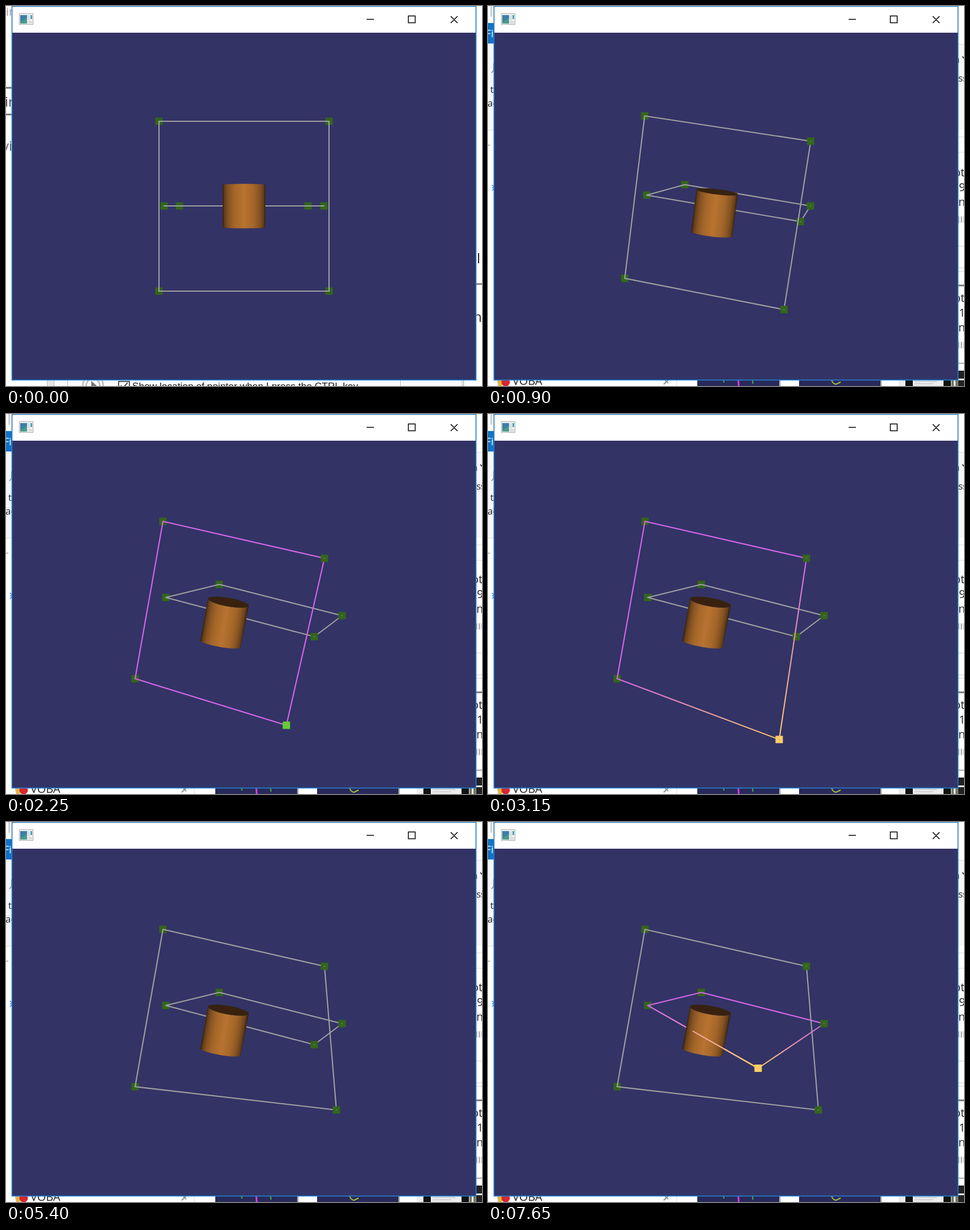
An HTML page for the animation above (8 s loop, 837 by 669 pixels).

```html
<!DOCTYPE html>
<html lang="en">
<head>
<meta charset="utf-8">
<title>Box handles around a cylinder</title>
<style>
  html, body { margin: 0; width: 100%; height: 100%; overflow: hidden; background: #fff; }
  svg { display: block; width: 837px; height: 669px; }
  text { font-family: "Open Sans", "Noto Sans", sans-serif; font-size: 20px; fill: #222; }
</style>
</head>
<body>
<svg viewBox="0 0 837 669" xmlns="http://www.w3.org/2000/svg">
  <defs>
    <clipPath id="listClip"><rect x="820" y="274" width="17" height="395"/></clipPath>
  </defs>
  <rect width="837" height="669" fill="#fff"/>

  <g id="settings">
    <text x="0" y="17" style="fill:#999">ir</text>
    <path d="M0 144H11M0 191H11" stroke="#777" stroke-width="3"/>
    <text x="-2" y="177" style="font-size:24px;fill:#555">ir</text>
    <text x="-7" y="255" style="font-size:24px;fill:#666">vi</text>
    <text x="828" y="453" style="font-size:24px">l</text>
    <path d="M826 489.500H837" stroke="#888" stroke-width="3"/>
    <text x="822" y="556" style="font-size:24px">no</text>
    <rect x="72" y="658" width="734" height="11" fill="#e6e6e6"/>
    <rect x="84" y="658" width="716" height="11" fill="#fafafa"/>
    <path d="M72.500 658V669M84.500 658V669M108.500 658V669M693.500 658V669M804.500 658V669" stroke="#bbb"/>
    <g fill="none" stroke="#bbb" stroke-width="2.500">
      <circle cx="153" cy="668" r="18"/><circle cx="153" cy="668" r="12"/>
    </g>
    <path d="M150 660L160 669H150Z" fill="#777"/>
    <path d="M198 669V661H217V669M202 668L206 672L214 663" fill="none" stroke="#222" stroke-width="1.500"/>
    <text x="222" y="675" style="font:17.300px 'Liberation Sans',Arial,sans-serif">Show location of pointer when I press the CTRL key</text>
  </g>

  <g id="files">
    <rect y="66" width="837" height="152" fill="#f5f6f7"/>
    <path d="M0 218.500H11M826 67.500H837M826 230.500H837M826 257.500H837" stroke="#ddd"/>
    <path d="M5.500 0V19" stroke="#888"/>
    <rect y="30" width="11" height="36" fill="#1173c7"/>
    <text x="-4" y="55" style="font-size:18px;fill:#fff">Fil</text>
    <path d="M6 118L10 113L10 101" fill="none" stroke="#999" stroke-width="2"/>
    <text x="4" y="153" style="font-size:17px">t</text>
    <text x="-1" y="177" style="font-size:17px">ac</text>
    <path d="M0 245H4" stroke="#bbb" stroke-width="2"/>
    <path d="M7 320H11M7 315L11 319M7 325L11 321" stroke="#2d8bd8" stroke-width="1.500"/>
    <text x="819" y="100" style="font-size:17px">n</text>
    <path d="M834 89L837 92" stroke="#444" stroke-width="2"/>
    <text x="827" y="133" style="font-size:17px">ss</text>

    <path d="M16 660L22 655L27 663L24 669H18Z" fill="#e0b84c"/>
    <circle cx="31" cy="662" r="7.500" fill="#d9272e"/>
    <text x="43" y="667">VOBA</text>
    <path d="M309 666L314 661M311 658L317 664M314 661L319 656" stroke="#8a949c" stroke-width="2"/>
    <path d="M331.500 658V669" stroke="#ddd"/>
    <path d="M513 658V669M691 658V669" stroke="#aaa" stroke-width="3"/>
    <rect x="368" y="658" width="144" height="11" fill="#29295a"/>
    <rect x="547" y="658" width="143" height="11" fill="#29295a"/>

    <g id="checks">
      <path d="M603 659Q612 666 621 659" fill="none" stroke="#a04cc0" stroke-width="2"/>
      <path d="M368 666H512M547 666H690" stroke="#1c1c40" stroke-width="5"/>
      <g id="marks"></g>
      <rect x="817" y="655" width="20" height="14" fill="#b8a8a8"/>
    </g>
    <g id="thumbs" fill="none" stroke-width="2">
      <path d="M414 658L415 663M465 658L466 665" stroke="#3fae4a"/>
      <path d="M440 658L441 669" stroke="#d23fd2" stroke-width="3"/>
      <path d="M604 658Q606 665 612 666L620 662" stroke="#a9bd3c"/>
      <rect x="722" y="658" width="115" height="11" fill="#ededed" stroke="none"/>
      <path d="M734 658H747V669H734ZM801 658H814V669H801Z" fill="#111" stroke="none"/>
      <path d="M750 661H790M750 665H783" stroke="#b4b8be" stroke-width="1"/>
      <path d="M815 664H837" stroke="#776" stroke-width="10" stroke-dasharray="4 3"/>
    </g>
    <g clip-path="url(#listClip)"><g id="list"></g></g>
  </g>

  <rect x="10.500" y=".5" width="816" height="658" fill="#336" stroke="#1f7fd0" stroke-width="1.600"/>
  <rect x="11.300" y="1.300" width="814.400" height="45.700" fill="#fff"/>
  <g>
    <rect x="23.500" y="13.500" width="24" height="19" fill="#f4f4f4" stroke="#aaa"/>
    <rect x="25" y="16" width="12" height="15" fill="#4a9a8c"/>
    <path d="M25 16H37V21L25 28Z" fill="#3d7fa6"/>
    <rect x="38" y="16" width="4" height="9" fill="#d5dde4"/>
    <rect x="43" y="16" width="3" height="7" fill="#4f9fb5"/>
    <rect x="38" y="26" width="8" height="5" fill="#dcdcdc"/>
  </g>
  <path d="M634 23.500H647M707.500 17.500H719.500V29.500H707.500ZM782 18L794 30M794 18L782 30" fill="none" stroke="#000" stroke-width="1.500"/>
  <g id="scene"></g>
</svg>

<script>
const $ = id => document.getElementById(id);
const STEP = 450, LOOP = 8000;
const GREY = '#a0a0a0', PINK = '#d966ea', GOLD = '#ffcc66', GREEN = '#33661a', LIME = '#66cc33';

// Each pose: upright frame, flat frame, cylinder rim ends (top, bottom), rim depths
const poses = [
  [269,203, 568,203, 568,502, 269,502,  278,352, 305,352, 531,352, 559,352,
   381,315, 456,315, 381,389.5, 456,389.5,  -2, 2],
  [275,198, 575,222, 548,521, 254,493,  277,343, 317,329, 543,349, 557,367,
   378,320.5, 452,325.5, 373,396, 446.5,401.5,  2, 3],
  [276,189, 560,254, 493,548, 227,466,  281,323, 375,300, 591,355, 542,392,
   355,325, 427,337.5, 341.5,399.5, 412.5,411,  7.5, 6]
];

const mix = (a, b, k) => a + (b - a) * k;
const mixPt = (a, b, k) => [mix(a[0], b[0], k), mix(a[1], b[1], k)];

function poseAt(step) {
  const k = step < 2 ? step : step === 2 ? 1.5 : 2;
  const i = Math.min(Math.floor(k), 1);
  const v = poses[i].map((n, j) => mix(n, poses[i + 1][j], k - i));
  const pt = j => [v[2 * j], v[2 * j + 1]];
  return {
    upright: [0, 1, 2, 3].map(pt), flat: [4, 5, 6, 7].map(pt),
    rim: [8, 9, 10, 11].map(pt), depth: v.slice(24)
  };
}

function uprightCorner(step, rest) {
  if (step < 6) return rest;
  if (step === 6) return [500, 562];
  if (step === 7) return [512, 573];
  return step === 8 ? [554, 547] : [581, 507];
}

let gradients = 0;
function edge(a, b, ca, cb) {
  const line = c => `<path d="M${a}L${b}" stroke="${c}" stroke-width="2.1" stroke-linecap="round"/>`;
  if (ca === cb) return line(ca);
  const id = 'edge' + gradients++;
  return `<linearGradient id="${id}" gradientUnits="userSpaceOnUse" x1="${a[0]}" y1="${a[1]}" x2="${b[0]}" y2="${b[1]}">
    <stop stop-color="${ca}"/><stop offset="1" stop-color="${cb}"/></linearGradient>` + line(`url(#${id})`);
}

const handle = ([x, y], c) => `<rect x="${x - 6.5}" y="${y - 6.5}" width="13" height="13" fill="${c}"/>`;

// state: 0 idle, 1 hovered, 2 dragged
function quad(pts, hot, state, front) {
  const base = state ? PINK : GREY;
  const lineColor = i => state === 2 && i === hot ? GOLD : base;
  const fill = i => i === hot ? [GREEN, LIME, GOLD][state] : GREEN;
  const isFront = i => front.includes(i);
  const squares = test => pts.map((p, i) => test(i) ? handle(p, fill(i)) : '').join('');
  const lines = pts.map((p, i) => {
    const j = (i + 1) % 4;
    return edge(p, pts[j], lineColor(i), lineColor(j));
  }).join('');
  const dots = front.map(i => `<circle cx="${pts[i][0]}" cy="${pts[i][1]}" r=".8" fill="${base}"/>`).join('');
  return squares(i => !isFront(i)) + lines + squares(isFront) + dots;
}

function cylinder([tl, tr, bl, br], [top, bottom]) {
  const dx = tr[0] - tl[0], dy = tr[1] - tl[1];
  const r = Math.hypot(dx, dy) / 2, turn = Math.atan2(dy, dx) * 180 / Math.PI;
  const arc = (depth, sweep, to) => `A${r} ${Math.abs(depth)} ${turn} 0 ${sweep} ${to}`;
  const a = mixPt(tl, bl, .5), b = mixPt(tr, br, .5);
  const stops = [[0, '#38220f'], [.05, '#65401b'], [.14, '#885422'], [.28, '#a4672a'], [.5, '#b8732f'],
    [.72, '#a4672a'], [.86, '#885422'], [.95, '#65401b'], [1, '#38220f']];
  const cap = top > 0 ? `<path d="M${tl}${arc(top, 1, tr)}${arc(top, 1, tl)}Z" fill="#38220f"/>` : '';
  return `<linearGradient id="copper" gradientUnits="userSpaceOnUse" x1="${a[0]}" y1="${a[1]}" x2="${b[0]}" y2="${b[1]}">
    ${stops.map(([o, c]) => `<stop offset="${o}" stop-color="${c}"/>`).join('')}</linearGradient>
    <path d="M${tl}${arc(top, top < 0 ? 1 : 0, tr)}L${br}${arc(bottom, 1, bl)}Z" fill="url(#copper)"/>` + cap;
}

function drawScene(step) {
  gradients = 0;
  const { upright, flat, rim, depth } = poseAt(step);
  upright[2] = uprightCorner(step, upright[2]);
  const pull = Math.max(0, (step - 15) / 2);
  flat[3] = mixPt(flat[3], [475, 433.5], pull);
  const upState = step >= 6 && step <= 9 ? 2 : step === 5 || step === 10 ? 1 : 0;
  const flatState = step > 14 ? 2 : step >= 13 ? 1 : 0;

  let out = quad(flat, 3, flatState, step ? [2, 3] : []) + cylinder(rim, depth);
  if (pull) {
    // the dragged edge comes out through the cylinder wall
    const s = mix(.8, .41, pull);
    const mid = s < .5 ? '#f0a0a8' : '#f2aa9c';
    out += edge(mixPt(flat[0], flat[3], s), flat[3], mid, GOLD);
  }
  out += quad(upright, 2, upState, step ? [1, 2] : []);
  $('scene').innerHTML = out;
}

function drawBackdrop(step) {
  const show = (id, on) => $(id).style.display = on ? '' : 'none';
  show('settings', step === 0);
  show('files', step > 0);
  show('checks', step === 1);
  show('thumbs', step > 1);
  $('list').setAttribute('transform', `translate(0 ${step < 2 ? -30 : step < 4 ? 0 : -2})`);
}

function listItem(y, digit) {
  return `<text x="819" y="${y + 7}">ot</text><text x="828" y="${y + 33}">${digit}</text>
    <text x="815" y="${y + 59}">on</text>
    <path d="M826 ${y + 83}H837" stroke="#bbb" stroke-width="11" stroke-dasharray="3 2"/>
    <path d="M826 ${y + 130}H837M826 ${y + 168}H837M826 ${y + 174}H837" stroke="#ccc"/>
    <path d="M826 ${y + 199}H837" stroke="#777" stroke-width="3"/>`;
}
$('list').innerHTML = listItem(293, 9) + listItem(514, 1) +
  '<path d="M826 629H837" stroke="#aaa" stroke-width="2"/>' +
  '<path d="M832 642V690" stroke="#222" stroke-width="11" stroke-dasharray="14 3"/>';
$('marks').innerHTML = [382, 559, 737].map(x =>
  `<circle cx="${x}" cy="670" r="17" fill="#2f9e44"/>
   <path d="M${x - 9} 664L${x - 3} 670L${x + 9} 658" fill="none" stroke="#fff" stroke-width="4"/>`).join('');

let shown = -1;
function update(ms) {
  const step = Math.floor(ms % LOOP / STEP);
  if (step !== shown) {
    shown = step;
    drawBackdrop(step);
    drawScene(step);
  }
}

const start = performance.now();
function tick() {
  update(performance.now() - start);
  requestAnimationFrame(tick);
}
tick();
</script>
</body>
</html>
```
